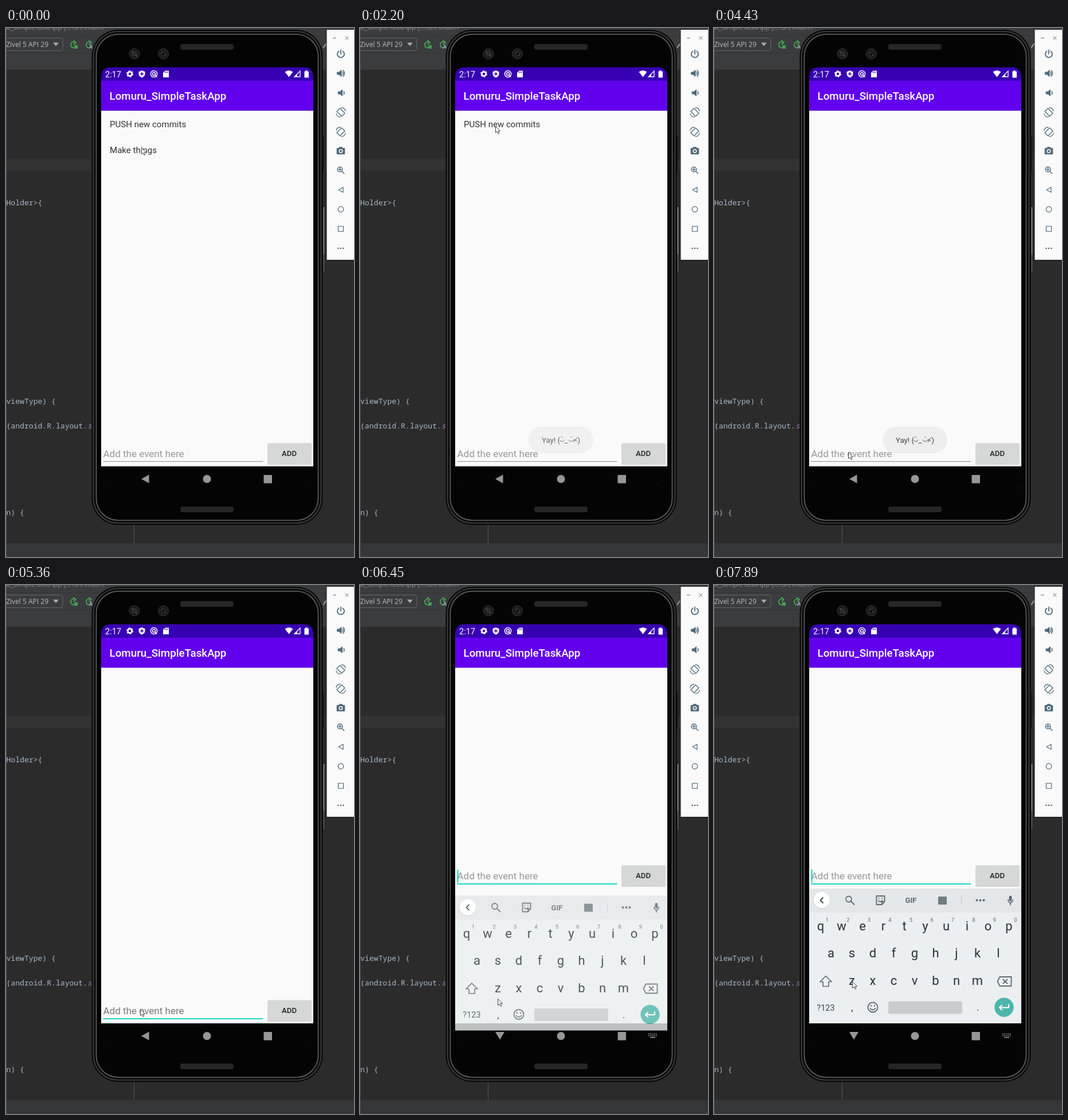
Write an HTML page that moves like this. It is 607 px wide and 922 px high and loops after 8000 ms.

```html
<!DOCTYPE html>
<html lang="en">
<head>
<meta charset="utf-8">
<title>To-do app on an emulator</title>
<style>
  html, body { margin: 0; width: 100%; height: 100%; overflow: hidden; background: #2b2b2b; }
  svg { display: block; width: 607px; height: 922px; }
  text { font-family: Roboto, sans-serif; white-space: pre; }
  .code text { font: 13.1px "Noto Sans Mono", monospace; fill: #a9b7c6; }
  .ide { font: 12px "Open Sans", sans-serif; fill: #bbb; }
  .item { font-size: 15.06px; fill: #343434; }
  .mid { text-anchor: middle; }
  .key { font-size: 22px; fill: #263238; text-anchor: middle; }
  .digit { font-size: 9.5px; fill: #5f6b72; text-anchor: middle; }
  .line { fill: none; stroke-linecap: round; stroke-linejoin: round; }
</style>
</head>
<body>
<svg viewBox="0 0 607 922">
  <!-- editor behind the emulator -->
  <rect width="607" height="922" fill="#2b2b2b"/>
  <rect width="607" height="72" fill="#3a3c3e"/>
  <path d="M0 13.5H607M0 43.5H607" stroke="#323436"/>
  <path d="M0 72.5H607" stroke="#333537"/>
  <text class="ide" x="0" y="3" style="fill:#8a8c8e">u_SimpleTaskApp [...\src\main\</text>
  <rect x="-5" y="17.5" width="104" height="22" rx="3" fill="#3a3c3e" stroke="#646769"/>
  <text class="ide" x="74" y="32.5" text-anchor="end">Zivel 5 API 29</text>
  <path d="M82 25.5H92L87 31.5Z" fill="#a9abad"/>
  <g class="line" stroke="#499c54" stroke-width="2">
    <path id="rerun" d="M118 34.5A5.2 5.2 0 1 1 121 25M118 22L122 25.5 118 28.5"/>
    <use href="#rerun" x="27"/>
  </g>
  <path d="M119 30h6v6h-6z" fill="#499c54"/>
  <text x="145" y="36" font-size="9" font-weight="700" fill="#a9b7c6">A</text>
  <path d="M554 34Q556 29 560 27" class="line" stroke="#9a9c9e" stroke-width="2"/>
  <rect y="228" width="607" height="21" fill="#323232"/>
  <g class="code">
    <text x="0.5" y="309">Holder&gt;{</text>
    <text x="0.5" y="655">viewType) {</text>
    <text x="0.5" y="698">(android.R.layout.<tspan fill="#9876aa" font-style="italic">s</tspan></text>
    <text x="0.5" y="849">n) {</text>
  </g>
  <path d="M223.5 866V898" stroke="#555"/>
  <rect y="898" width="607" height="24" fill="#343638"/>
  <path d="M.5 0V922" stroke="#515456"/>

  <!-- phone -->
  <rect x="551" y="188" width="4" height="62" rx="1" fill="#1b1b1b"/>
  <rect x="551" y="309" width="4.5" height="118" rx="1" fill="#242424"/>
  <path d="M554.5 312V394" stroke="#c9c9c9"/>
  <path d="M554.5 394V426" stroke="#777"/>
  <rect x="149.500" y="3" width="403" height="863" rx="46" fill="#070707"/>
  <rect x="152.500" y="6" width="397" height="857" rx="43" fill="#0c0c0c" stroke="#464646" stroke-width="1.600"/>
  <rect x="157.500" y="11" width="387" height="847" rx="38" fill="#040404" stroke="#666" stroke-width="1.500"/>
  <g fill="#262626">
    <rect x="304" y="28" width="93" height="10" rx="4"/>
    <rect x="304" y="834" width="93" height="10" rx="4"/>
  </g>
  <g stroke="#363636" fill="#1b1b1b">
    <circle cx="224" cy="45" r="9"/><circle cx="274.5" cy="45" r="9"/>
    <circle cx="224" cy="45" r="4" fill="#292929"/><circle cx="274.5" cy="45" r="4" fill="#101010"/>
  </g>
  <path d="M219 40l3 3M226 47l3 3M272 43h2M276 47h2" stroke="#777"/>
  <path d="M170 798l5 6M532 798l-5 6" stroke="#333" stroke-dasharray="1 3"/>

  <!-- app -->
  <rect x="166" y="92" width="370" height="672" fill="#fafafa"/>
  <path d="M166 92V84Q167 69 182 68.500H520Q535 69 536 84V92Z" fill="#3700b3"/>
  <rect x="166" y="92" width="370" height="52" fill="#6200ee"/>
  <path d="M166 144.5H536" stroke="#d9d5e2"/>
  <g fill="#fff">
    <text x="173" y="85.5" font-size="14.5">2:17</text>
    <circle cx="216" cy="80" r="3.6" fill="none" stroke="#fff" stroke-width="2.8"/>
    <circle cx="216" cy="80" r="5.3" fill="none" stroke="#fff" stroke-width="1.5" stroke-dasharray="2.6 2.95"/>
    <path d="M237 74l5.5 2.2v3.8q0 4-5.5 6.5-5.5-2.5-5.5-6.5v-3.8z"/>
    <path d="M237 77v6M234 80h6" stroke="#3700b3" stroke-width="1.5"/>
    <g class="line" stroke="#fff" stroke-width="1.5">
      <circle cx="258" cy="80" r="5.6"/><circle cx="258" cy="80" r="2.5"/><path d="M260 82l3 3"/>
    </g>
    <path d="M277.500 74.500h6.500v11.500h-10v-8z"/>
    <path d="M277.500 76v2.500M279.700 76v2.500M281.800 76v2.500" stroke="#3700b3"/>
    <path d="M486.500 76.500Q493.500 71.500 500.500 76.500L493.500 85.500Z"/>
    <path d="M513 75v10h-10z" fill="none" stroke="#fff" stroke-width="1.3"/>
    <path d="M508 80v5h-5z"/>
    <path d="M522.500 74h3v1.500h2.500v11h-7.500v-11h2z"/>
    <text x="180.500" y="125" font-size="18.8" font-weight="500">Lomuru_SimpleTaskApp</text>
  </g>
  <text class="item" id="push" x="181" y="172.500">PUSH new commits</text>
  <text class="item" id="make" x="181" y="217.500">Make things</text>

  <g id="entry">
    <text id="hint" x="169.500" y="748" font-size="17.050">Add the event here</text>
    <path id="underline"/>
    <path id="caret" d="M170.500 731V754" stroke="#03dac5" stroke-width="2"/>
    <rect x="456" y="725" width="77" height="36" rx="2" fill="#c3c3c3" opacity=".7"/>
    <rect x="456.500" y="723.500" width="76" height="36" rx="2" fill="#d6d7d7"/>
    <text class="mid" x="494" y="746" font-size="13.2" font-weight="500" fill="#212121">ADD</text>
  </g>

  <g id="toast">
    <rect x="294" y="695" width="113" height="46" rx="23" fill="#eeeeee"/>
    <g font-size="13.2" fill="#424242">
      <text x="317" y="723">Yay! (</text>
      <text x="356.500" y="723">_</text>
      <text x="379.500" y="723">)</text>
    </g>
    <path class="line" d="M348 718q4 6 8 0M364 718q4 6 8 0M351 712l2 2M369.500 712l-2 2M373 722l5.500-8M373.500 716.500l5 4M372.500 719l3-1" stroke="#555"/>
  </g>

  <!-- soft keyboard -->
  <g id="keyboard">
    <rect x="166" y="529" width="370" height="235" fill="#eceff1"/>
    <rect x="166" y="529" width="370" height="42" fill="#e4e7e9"/>
    <circle cx="188" cy="549.800" r="14.500" fill="#d2d6d8"/>
    <circle cx="188" cy="549" r="14" fill="#fff"/>
    <g class="line" stroke="#5f6a70" stroke-width="1.8">
      <path d="M190 545l-4.500 4.500 4.500 4.500" stroke="#37474f"/>
      <circle cx="235" cy="547.500" r="5"/><path d="M239 551.500l5.500 5.500"/>
      <path d="M283.500 542h14v10l-4.500 5h-9.500zM293 557v-5h4.500M287 550q3 4 6 0M287.500 546h.1M293 546h.1"/>
      <path d="M513 549a4 5 0 0 0 8 0M517 554v3.500"/>
      <rect x="515.500" y="542.500" width="3" height="8" rx="1.500" fill="#5f6a70"/>
      <path d="M497 682h20v16h-20l-4-8z" transform="translate(1.500 1)"/>
      <path d="M504.500 687.500l7 7M511.500 687.500l-7 7"/>
      <circle cx="277" cy="736" r="8.500"/><path d="M272.500 738q4.500 5 9 0"/>
    </g>
    <path id="shift" d="M195 681.500l10 10h-5v8h-10v-8h-5z" stroke="#5f6a70" stroke-width="1.700" stroke-linejoin="round"/>
    <text class="mid" x="343.500" y="554" font-size="13" font-weight="700" fill="#5f6a70">GIF</text>
    <rect x="391" y="543" width="15" height="14" rx="1" fill="#727c81"/>
    <path d="M431.500 541V558" stroke="#c8cdd0"/>
    <g fill="#5f6a70">
      <circle cx="458.500" cy="549.500" r="2"/><circle cx="464.500" cy="549.500" r="2"/><circle cx="470.500" cy="549.500" r="2"/>
      <circle cx="274" cy="733.500" r="1.300"/><circle cx="280" cy="733.500" r="1.300"/>
    </g>
    <g id="keys"></g>
    <text class="mid" x="195" y="741.500" font-size="14.500" fill="#37474f">?123</text>
    <text class="mid" x="241" y="742" font-size="18" fill="#37474f">,</text>
    <text class="mid" x="460" y="742" font-size="18" fill="#37474f">.</text>
    <rect x="304" y="725.500" width="129" height="22" rx="3" fill="#c9cccf"/>
    <circle cx="506" cy="736" r="16.700" fill="#4db6ac"/>
    <path class="line" d="M514 731.500v5h-15.500M502 732.500l-4 4 4 4" stroke="#fff" stroke-width="2"/>
  </g>

  <!-- navigation bar -->
  <g fill="#969696">
    <path id="back"/>
    <circle cx="350.500" cy="786" r="7"/>
    <rect x="449.500" y="779" width="14.500" height="14.500" rx="1"/>
    <g id="imeSwitch" stroke="#969696" stroke-width="1.700">
      <path d="M503 782.500H518M503 785.500H518" stroke-dasharray="2 1.200"/>
      <path d="M506 788.500H515"/>
    </g>
  </g>

  <!-- emulator controls -->
  <rect x="559" y="2.500" width="50" height="402" fill="#fafafa" stroke="#1d1d1d"/>
  <g class="line" stroke="#50697a" stroke-width="1.500">
    <path d="M570.500 17.500h5M592 15l5 5M597 15l-5 5" stroke-width="1"/>
    <path d="M580.500 40.500a6 6 0 1 0 7 0M584 38.500v6.500" stroke-width="1.800"/>
    <path id="speaker" d="M578 77h3l4-3.500v11l-4-3.500h-3z" fill="#50697a" stroke-width="1"/>
    <use href="#speaker" x="1.500" y="34"/>
    <path d="M587 76.500q2.500 2.500 0 5M588 73.500q5 5.500 0 11M589 110.500q2 2.500 0 5"/>
    <g id="rotate">
      <path d="M582.500 140l8.500 8.500-5.500 5.500-8.500-8.500z" stroke-width="1.300"/>
      <path d="M585 139q6 0 7 5.500M583 155q-6 0-7-5.500" stroke-width="1.300"/>
    </g>
    <use href="#rotate" transform="matrix(-1 0 0 1 1168 34)"/>
    <path d="M577.500 210h3l1.500-2h4l1.500 2h3v9.500h-13z" fill="#50697a"/>
    <circle cx="584" cy="214.500" r="2.800" fill="#50697a" stroke="#fafafa"/>
    <circle cx="582.500" cy="246.500" r="4.300"/><path d="M585.800 249.800l4 4M580.500 246.500h4M582.500 244.500v4"/>
    <path d="M588 277.500v9l-8-4.500z" stroke-width="1.200"/>
    <circle cx="584" cy="316" r="4.800" stroke-width="1.200"/>
    <rect x="579.500" y="345.500" width="9" height="9" stroke-width="1.200"/>
    <path d="M579.500 384h.1M584 384h.1M588.500 384h.1" stroke-width="2.600"/>
  </g>

  <path id="pointer" d="M0 0V11L2.600 8.600 4.600 12.800 6.400 12 4.600 8H8.200Z" fill="#fff" stroke="#333" stroke-width=".9"/>
</svg>
<script>
const LOOP = 8000;
const $ = id => document.getElementById(id);
const show = (id, on) => $(id).setAttribute('visibility', on ? 'visible' : 'hidden');
const set = (id, attrs) => {
  for (const name in attrs) $(id).setAttribute(name, attrs[name]);
};
const between = (t, from, to) => t >= from && t < to;

// Each track holds its value until the next [time, ...values] entry.
const held = (track, t) => track.filter(key => key[0] <= t).pop().slice(1);

const pointerTrack = [
  [0, 236.500, 209], [1230, 239, 203], [1370, 240, 189], [1510, 238, 175], [1650, 236.500, 171.500],
  [3620, 205, 430], [3740, 159, 663], [4050, 206, 706], [4180, 253, 741], [4300, 247, 746],
  [4430, 234.500, 739.500], [5920, 236, 735], [6060, 239, 727], [6200, 240.500, 721.500],
  [6600, 241, 700], [6750, 241.500, 691.500]
];
const toastTrack = [
  [0, 0], [550, .3], [690, .7], [840, 1], [2200, .8], [2350, .3], [2500, 0],
  [3070, .3], [3210, .7], [3350, 1], [4820, .8], [4950, .3], [5090, 0]
];
const keyboardTrack = [[0, 13, 0], [6450, 12.500, .8], [6600, 4, .95], [6750, 0, 1]];

const KEY_STEP = 36.500;
const rows = [['qwertyuiop', 186, 602], ['asdfghjkl', 204, 649], ['zxcvbnm', 240.500, 697]];
const letters = [];

function addText(parent, className, x, y, content) {
  const node = document.createElementNS('http://www.w3.org/2000/svg', 'text');
  node.setAttribute('class', className);
  node.setAttribute('x', x);
  node.setAttribute('y', y);
  node.textContent = content;
  parent.append(node);
  return node;
}

rows.forEach(([chars, left, baseline], row) => [...chars].forEach((char, i) => {
  const x = left + i * KEY_STEP;
  letters.push({ char, node: addText($('keys'), 'key', x, baseline, char) });
  if (row === 0) addText($('keys'), 'digit', x + 11.500, 586.500, (i + 1) % 10);
}));

function draw(t) {
  const [x, y] = held(pointerTrack, t);
  const [slide, alpha] = held(keyboardTrack, t);
  const focused = t >= 5360;
  const raised = t >= 6060;
  const shifted = between(t, 7770, 7890);

  show('make', t < 400);
  show('push', t < 2930);
  set('toast', { opacity: held(toastTrack, t)[0] });
  set('pointer', { transform: `translate(${x} ${y})` });

  set('entry', { transform: `translate(0 ${raised ? -235 : 0})` });
  set('hint', { fill: focused && !raised ? '#7a7a7a' : '#999' });
  set('underline', focused
    ? { d: 'M169.500 756H448.500', stroke: '#1fd5c5', 'stroke-width': 2 }
    : { d: 'M169.500 755.500H448.500', stroke: '#8a8a8a', 'stroke-width': 1 });
  show('caret', t >= 5500 && !between(t, 7030, 7460));

  set('keyboard', { transform: `translate(0 ${slide})`, opacity: alpha });
  set('shift', { fill: shifted ? '#5f6a70' : 'none' });
  for (const { char, node } of letters) {
    const label = shifted ? char.toUpperCase() : char;
    if (node.textContent !== label) node.textContent = label;
  }

  set('back', { d: raised ? 'M236 779H252L244 792.500Z' : 'M249.500 778.500V793.500L236 786Z' });
  show('imeSwitch', raised);
}

function tick() {
  draw(performance.now() % LOOP);
  requestAnimationFrame(tick);
}
tick();
</script>
</body>
</html>
```
